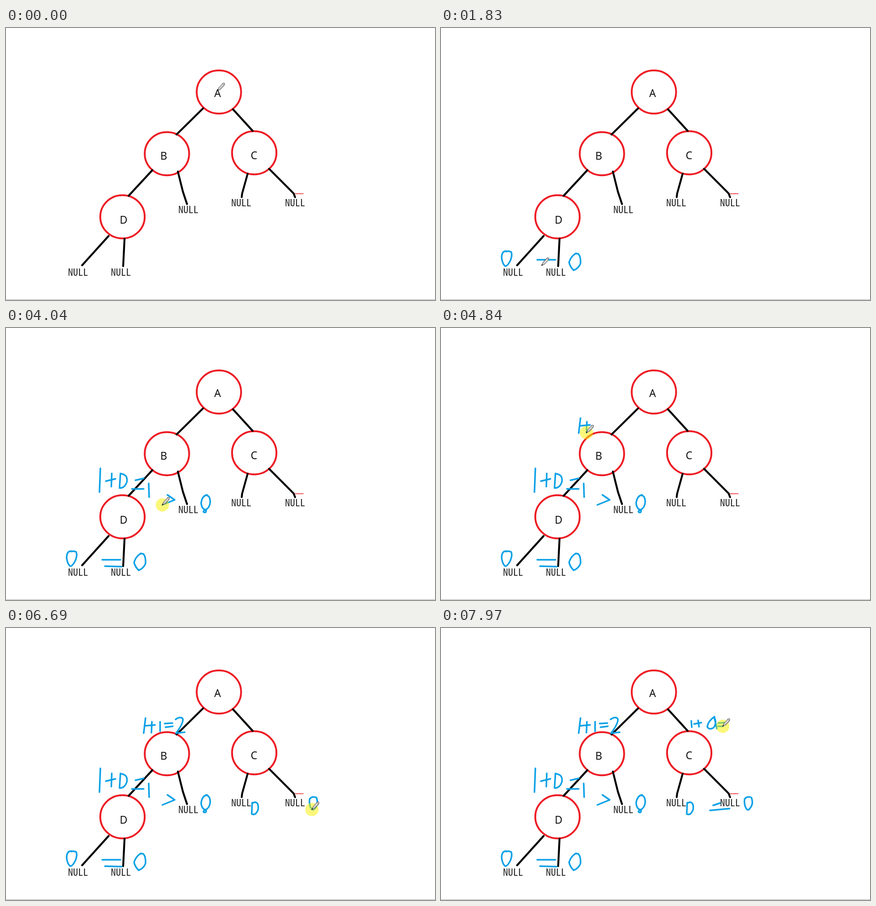
An HTML page for the animation above (7.99 s loop, 941 by 595 pixels).

```html
<!DOCTYPE html>
<html lang="en">
<head>
<meta charset="utf-8">
<title>Tree heights</title>
<style>
html, body { margin: 0; width: 100%; height: 100%; overflow: hidden; background: #fff; }
svg { display: block; width: 100vw; height: 100vh; }
path, ellipse { fill: none; stroke-linecap: round; stroke-linejoin: round; }
#nodes ellipse { stroke: #ed1c24; stroke-width: 4; }
#edges { stroke: #000; stroke-width: 4.2; }
#ink path { stroke: #0aa1e6; stroke-width: 3.5; }
text { text-anchor: middle; }
.letter { font: 23px "Open Sans", "Noto Sans", sans-serif; }
.leaf { font: 22px "Noto Sans Mono CJK SC", "Noto Sans Mono CJK JP", "Liberation Mono", monospace; fill: #222; }
</style>
</head>
<body>
<svg viewBox="0 0 941 595" preserveAspectRatio="none">
  <path d="M0 594H941" stroke="#c6c6c6" stroke-width="1.6"/>
  <g id="nodes"></g>
  <path id="edges" d="M432 176L374 233M498 178L541 225M321 311L269 367M377 314L388 358L397 385M530 319L518 362L517 370M577 308L631 362L634 370M225 455L167 519M260 461L257 521"/>
  <path d="M634 362.5H652" stroke="#ed1c24" stroke-width="1.3"/>
  <g id="labels"></g>
  <g id="ink"></g>
  <g id="pen">
    <circle id="glow" r="14.5" fill="#f8f000" fill-opacity=".52"/>
    <path d="M0 0L2.5 -6L12 -16.5L15.5 -16L15 -12.5L5.5 -2.5Z" style="fill:#fff" stroke="#444" stroke-width="1.1"/>
    <path d="M2.5 -6L5.5 -2.5M4.5 -5L13 -14.5M11 -15L14 -12" stroke="#777" stroke-width=".9"/>
    <path d="M0 0L1.5 -2" stroke="#222" stroke-width="1.8"/>
  </g>
</svg>
<script>
const LOOP = 7990, HOLD = 60;
const $ = id => document.getElementById(id);

function add(parent, tag, attrs, text = '') {
  const el = document.createElementNS('http://www.w3.org/2000/svg', tag);
  for (const key in attrs) el.setAttribute(key, attrs[key]);
  el.textContent = text;
  return $(parent).appendChild(el);
}

// letter, ellipse centre, letter centre and baseline
[['A', 467, 140, 464, 151], ['B', 353, 275, 346, 288],
 ['C', 544.5, 273, 544, 286.5], ['D', 255.5, 413, 258, 428]].forEach(([name, cx, cy, x, y]) => {
  add('nodes', 'ellipse', { cx, cy, rx: 48.7, ry: 47.2 });
  add('labels', 'text', { x, y, class: 'letter' }, name);
});
[[158, 542], [252, 542], [400, 405], [516, 390], [634, 390]].forEach(([x, y]) =>
  add('labels', 'text', { x, y, class: 'leaf' }, 'NULL'));

// start, end, path, optional control point for the travel before the stroke
const strokes = [
  [690, 930, 'M143 488Q133 488 133 503Q135 517 141 521Q146 521 152 509Q157 497 154 490Q149 487 143 489'],
  [1210, 1460, 'M296 493Q284 500 281 513Q283 522 291 530Q302 526 306 515Q307 500 301 494Q298 493 294 494', [215, 418]],
  [1610, 1700, 'M211 507L251 507'],
  [1850, 1940, 'M217 521L254 522'],
  [2190, 2280, 'M207 307L205 359'],
  [2370, 2420, 'M219 335L240 330'],
  [2480, 2530, 'M232 318L231 347'],
  [2590, 2690, 'M251 318L249 350Q260 351 265 337Q268 321 253 319'],
  [2750, 2780, 'M284 333L302 329'],
  [2820, 2860, 'M276 352L302 352'],
  [2990, 3080, 'M313 340L314 370'],
  [3420, 3640, 'M441 365Q430 367 428 383Q429 395 437 398Q447 394 448 380Q447 365 438 366M438 398Q431 400 434 403Q440 405 439 398'],
  [3860, 4030, 'M354 365L370 376L343 387'],
  [4480, 4560, 'M306 197L302 230', [480, 300]],
  [4640, 4690, 'M305 214L327 212'],
  [4755, 4800, 'M320 205L319 229'],
  [4870, 4920, 'M338 205L338 226'],
  [5000, 5050, 'M348 209L365 208'],
  [5120, 5170, 'M350 217L366 215'],
  [5270, 5475, 'M372 200Q383 192 388 199Q389 209 373 230L392 228'],
  [5850, 6020, 'M540 382L539 407Q548 411 553 397Q555 382 546 381L540 383'],
  [6440, 6670, 'M671 397Q664 388 666 374Q672 367 681 371Q686 385 678 394Q675 399 671 397', [610, 216]],
  [6840, 6900, 'M597 388L612 383'],
  [6980, 7050, 'M590 399L633 395'],
  [7340, 7400, 'M549 203L550 217'],
  [7475, 7510, 'M555 210L571 207'],
  [7570, 7600, 'M564 202L566 216'],
  [7665, 7785, 'M600 194Q586 203 584 216Q588 224 598 218Q606 208 599 194L605 220'],
  [7845, 7870, 'M608 208L621 207'],
  [7935, 7960, 'M607 215L618 215']
].map(([start, end, d, via]) => {
  const path = add('ink', 'path', { d });
  const length = path.getTotalLength();
  const at = u => { const p = path.getPointAtLength(length * u); return [p.x, p.y]; };
  return { start, end, path, length, via, at };
});

const REST = [464, 137];
const clamp = v => Math.max(0, Math.min(1, v));
const smooth = u => u * u * (3 - 2 * u);

function penAt(t) {
  let from = REST, left = 140;
  for (const s of strokes) {
    if (t < s.start) {
      const u = smooth(clamp((t - left) / (s.start - left))), to = s.at(0);
      return from.map((a, i) => {
        const c = s.via ? s.via[i] : (a + to[i]) / 2;
        return (1 - u) ** 2 * a + 2 * u * (1 - u) * c + u * u * to[i];
      });
    }
    if (t < s.end + HOLD) return s.at(clamp((t - s.start) / (s.end - s.start)));
    from = s.at(1);
    left = s.end + HOLD;
  }
  return from;
}

function draw(now) {
  const t = now % LOOP;
  for (const s of strokes) {
    const shown = clamp((t - s.start) / (s.end - s.start)) * s.length;
    s.path.style.display = t < s.start ? 'none' : '';
    s.path.style.strokeDasharray = shown < s.length ? `${shown} ${s.length + 9}` : 'none';
  }
  const [x, y] = penAt(t);
  $('pen').setAttribute('transform', `translate(${x} ${y})`);
  const pressed = strokes.some(s => t >= s.start && t < s.end + HOLD);
  $('glow').style.display = pressed ? '' : 'none';
}

const began = performance.now();
function tick() {
  draw(performance.now() - began);
  requestAnimationFrame(tick);
}
tick();
</script>
</body>
</html>
```
